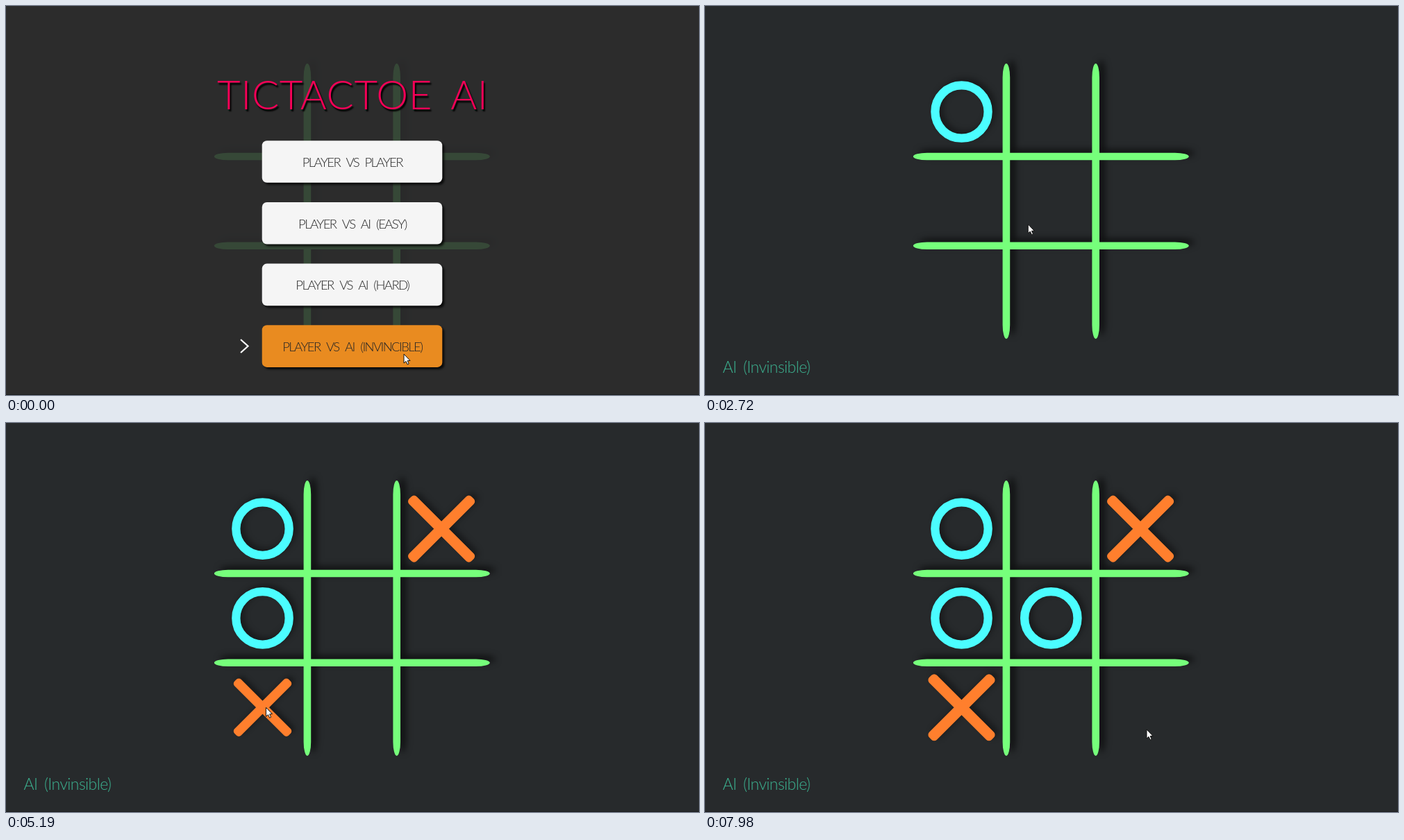
These frames come from a looping animation (998x561 px, 8 s). An HTML page with a canvas:

```html
<!DOCTYPE html>
<html lang="en">
<head>
<meta charset="utf-8">
<title>Tic-tac-toe</title>
<style>
  html, body { margin: 0; width: 100%; height: 100%; overflow: hidden; background: #272a2c; }
  canvas { display: block; }
</style>
</head>
<body>
<canvas id="stage" width="998" height="561"></canvas>
<script>
const W = 998, H = 561, LOOP = 8000, FRAME = 66.5;
const CELL = 128.8, CENTER = { x: 498.3, y: 281.4 };
const stage = document.getElementById('stage').getContext('2d');

const moves = [
  { kind: 'o', col: -1, row: -1, start: 1842 },
  { kind: 'x', col: 1, row: -1, start: 3170 },
  { kind: 'o', col: -1, row: 0, start: 4130 },
  { kind: 'x', col: -1, row: 1, start: 4890 },
  { kind: 'o', col: 0, row: 0, start: 5467 }
];

// Where the pointer turns or rests
const stops = [
  { at: 0, x: 573, y: 502 },
  { at: 1055, x: 568, y: 502 },
  { at: 1854, x: 407, y: 189 },
  { at: 2718, x: 465, y: 315 },
  { at: 3120, x: 666, y: 168 },
  { at: 3590, x: 404, y: 416 },
  { at: 4115, x: 584, y: 214 },
  { at: 4647, x: 401, y: 330 },
  { at: 4870, x: 370, y: 430 },
  { at: 5777, x: 383, y: 372 },
  { at: 6180, x: 690, y: 310 },
  { at: 6900, x: 572, y: 402 },
  { at: 7250, x: 618, y: 293 },
  { at: 7650, x: 618, y: 293 },
  { at: 7972, x: 636, y: 442 }
];

const pointerShape = new Path2D('M0 0V13L3 10.4 5.2 15 7.2 14 5.2 9.6 9 9.4Z');
const chevron = new Path2D('M338 481L348.5 490.5 338 500');

const clamp = v => Math.max(0, Math.min(1, v));
const mix = (a, b, k) => a + (b - a) * k;

function elasticOut(t) {
  if (t <= 0) return 0;
  if (t >= 1) return 1;
  return 1 + 2 ** (-10 * t) * Math.sin((10 * t - 0.75) * 2 * Math.PI / 3);
}

function pointerAt(time) {
  const i = stops.findIndex(s => s.at > time);
  if (i < 0) return stops[stops.length - 1];
  const a = stops[i - 1], b = stops[i];
  const k = (time - a.at) / (b.at - a.at);
  return { x: mix(a.x, b.x, k), y: mix(a.y, b.y, k) };
}

function setShadow(c, alpha, x, y, blur) {
  c.shadowColor = `rgba(0,0,0,${alpha})`;
  c.shadowOffsetX = x;
  c.shadowOffsetY = y;
  c.shadowBlur = blur;
}

function write(c, text, x, y, { size, color, letter, word, align = 'left' }) {
  c.font = `300 ${size}px Lato, sans-serif`;
  c.fillStyle = color;
  c.letterSpacing = letter + 'px';
  c.wordSpacing = word + 'px';
  c.textAlign = align;
  c.fillText(text, x, y);
}

function drawGrid(c) {
  const length = 397, thick = 10.6, taper = 20;
  c.save();
  c.translate(CENTER.x, CENTER.y);
  setShadow(c, 0.6, 8, -5, 10);
  c.fillStyle = '#76ff7b';
  c.beginPath();
  for (const side of [-0.5, 0.5]) {
    const edge = side * CELL - thick / 2;
    c.roundRect(edge, -length / 2, thick, length, { x: thick / 2, y: taper });
    c.roundRect(-length / 2, edge, length, thick, { x: taper, y: thick / 2 });
  }
  c.fill();
  c.restore();
}

function drawPiece(c, { kind, col, row, start }, time) {
  const size = elasticOut((time - start) / 1000);
  if (!size) return;
  c.save();
  c.translate(CENTER.x + col * CELL, CENTER.y + row * CELL);
  c.scale(size, size);
  setShadow(c, 0.38, 5 * size, -4 * size, 9 * size);
  c.beginPath();
  if (kind === 'o') {
    c.strokeStyle = '#4bfdff';
    c.lineWidth = 12.3;
    c.arc(0, 0, 38.2, 0, 2 * Math.PI);
    c.stroke();
  } else {
    c.fillStyle = '#ff7f2d';
    c.rotate(Math.PI / 4);
    c.roundRect(-63.5, -7.7, 127, 15.4, 5.5);
    c.roundRect(-7.7, -63.5, 15.4, 127, 5.5);
    c.fill();
  }
  c.restore();
}

function drawPointer(c, { x, y }) {
  c.save();
  c.translate(x, y);
  c.fillStyle = '#fff';
  c.strokeStyle = '#111';
  c.lineWidth = 1;
  c.lineJoin = 'round';
  c.fill(pointerShape);
  c.stroke(pointerShape);
  c.restore();
}

function drawButton(c, label, top, active) {
  c.save();
  c.beginPath();
  c.roundRect(368.7, top, 259.6, 60.6, 7);
  c.fillStyle = active ? '#e98b20' : '#f5f5f5';
  setShadow(c, 0.75, 3, 3, 3);
  c.fill();
  c.restore();
  write(c, label, CENTER.x + 0.5, top + 37.8,
    { size: 18.5, color: '#262626', letter: -1.6, word: 5, align: 'center' });
}

function buildMenu() {
  const layer = document.createElement('canvas');
  layer.width = W;
  layer.height = H;
  const c = layer.getContext('2d');
  c.fillStyle = 'rgba(45,45,45,.87)';
  c.fillRect(0, 0, W, H);

  c.save();
  setShadow(c, 1, 2, 3, 2);
  write(c, 'TICTACTOE AI', 304, 149, { size: 58, color: '#f50057', letter: 0.6, word: 10 });
  c.restore();

  ['PLAYER VS PLAYER', 'PLAYER VS AI (EASY)', 'PLAYER VS AI (HARD)', 'PLAYER VS AI (INVINCIBLE)']
    .forEach((label, i) => drawButton(c, label, 194.2 + i * 88.7, i === 3));

  c.strokeStyle = '#fff';
  c.lineWidth = 2.2;
  c.stroke(chevron);
  return layer;
}

const menu = buildMenu();

function draw(time) {
  const fade = clamp((time - 1000) / 450);
  stage.fillStyle = '#272a2c';
  stage.fillRect(0, 0, W, H);
  drawGrid(stage);
  for (const move of moves) drawPiece(stage, move, time);

  stage.globalAlpha = 1 - fade;
  stage.drawImage(menu, 0, 0);
  stage.globalAlpha = fade;
  write(stage, 'AI (Invinsible)', 25.5, 529, { size: 23, color: '#3cb290', letter: -0.6, word: 4 });
  stage.globalAlpha = 1;

  stage.fillStyle = '#1b1d1f';
  stage.fillRect(0, H - 1, W, 1);
  drawPointer(stage, pointerAt(time));
}

function tick() {
  const step = Math.floor((performance.now() % LOOP + 16) / FRAME);
  draw(Math.max(0, step * FRAME - 8));
  requestAnimationFrame(tick);
}
tick();
</script>
</body>
</html>
```
